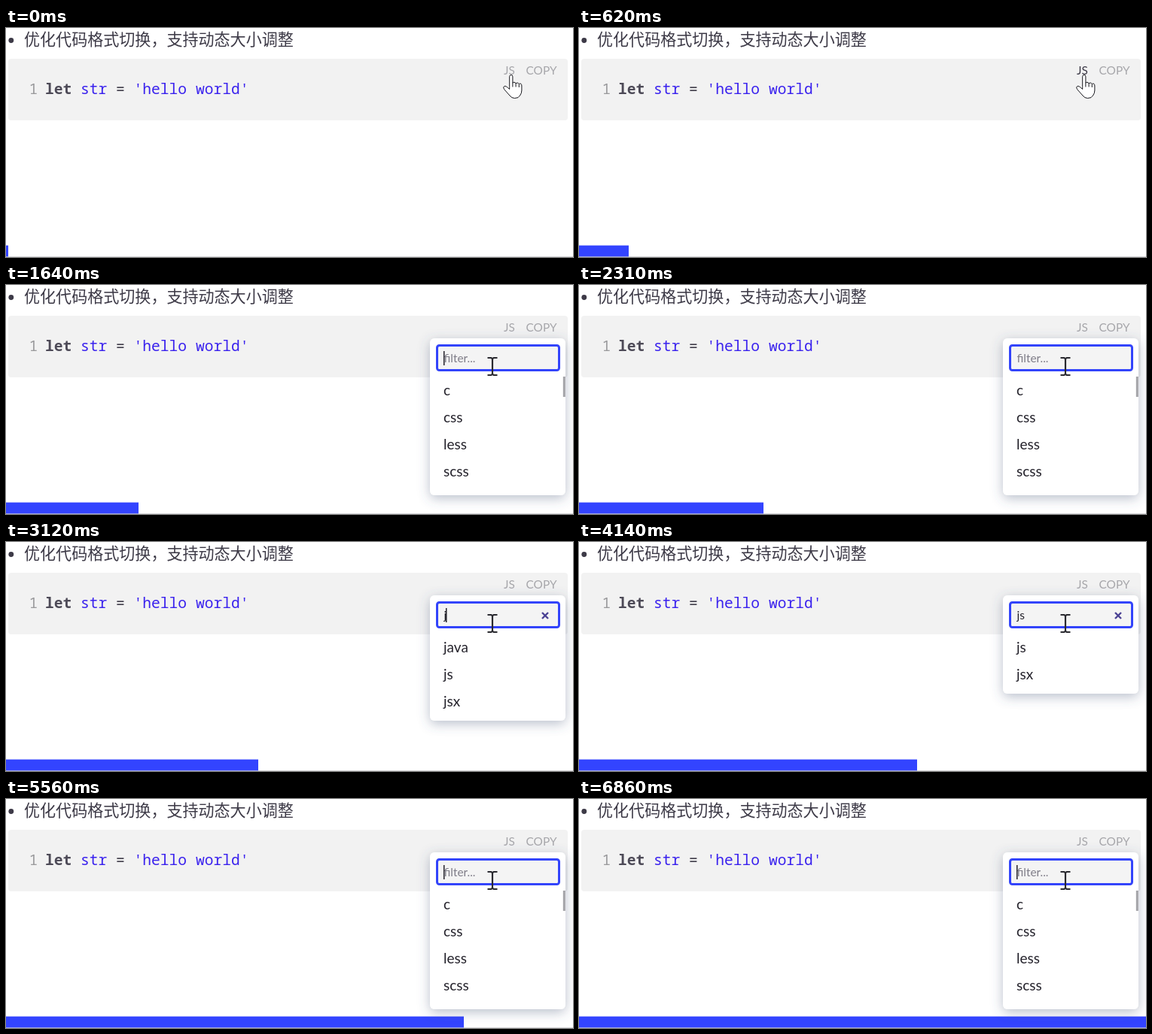
Recreate the animation shown at these times as an HTML page. Size 753 by 305 pixels, loop 6.89 s.

```html
<!DOCTYPE html>
<html lang="zh-CN">
<head>
<meta charset="utf-8">
<style>
  html, body { margin: 0; width: 100%; height: 100%; overflow: hidden; background: #fff; }
  svg { display: block; width: 753px; height: 305px; }
  text { white-space: pre; font-variant-ligatures: none; }
  .title { font: 300 21.05px "Noto Sans CJK SC", "Noto Sans CJK", sans-serif; fill: #3d3a47; }
  .code { font: 19.6px "Noto Sans Mono", monospace; fill: #3a22ee; }
  .number { fill: #9a9a9c; }
  .ui { font: 15.4px Lato, sans-serif; fill: #a7a7ab; }
  .item { font: 19px Lato, sans-serif; fill: #25232c; }
  .cursor { fill: #fff; stroke: #15151a; stroke-linejoin: round; }
</style>
</head>
<body>
<svg viewBox="0 0 753 305">
  <defs>
    <filter id="shadow" x="-20%" y="-20%" width="140%" height="140%">
      <feDropShadow dx="0" dy="4" stdDeviation="8" flood-color="#4a5578" flood-opacity=".38"/>
    </filter>
  </defs>
  <circle cx="6.8" cy="16.5" r="3.4" fill="#3d3a47"/>
  <text class="title" x="24" y="23">优化代码格式切换，支持动态大小调整</text>

  <rect x="3" y="41" width="743" height="82" rx="4" fill="#f2f2f2"/>
  <text class="code number" x="30.5" y="88">1</text>
  <text class="code" x="52" y="88"><tspan font-weight="700" fill="#4d4a57">let</tspan> str <tspan fill="#3d3a47">=</tspan> 'hello world'</text>
  <text class="ui" id="lang" x="661" y="62">JS</text>
  <text class="ui" x="690.5" y="62">COPY</text>

  <path d="M0 304.5H753" stroke="#dcdcde"/>
  <rect id="bar" y="289.6" height="14.8" fill="#3344ff"/>

  <g id="popup">
    <rect id="panel" x="563" y="71" width="180" rx="6" fill="#fff" filter="url(#shadow)"/>
    <rect x="571" y="79" width="165" height="36" rx="4" fill="#f4f4f4"/>
    <rect id="ring" x="572.5" y="80.5" width="162" height="33" rx="3" fill="none" stroke="#3344fb" stroke-width="3"/>
    <text class="ui" id="query" x="581.5" y="103"></text>
    <rect id="caret" y="88" width="1.5" height="19" fill="#25232c"/>
    <path id="clear" d="M712 94l8 8m0-8l-8 8" stroke="#4a4193" stroke-width="2.4"/>
    <g id="items"></g>
    <rect id="thumb" x="739.8" y="122" width="3" height="27" fill="#a3a3a8"/>
  </g>

  <g id="hand" class="cursor">
    <path d="M-1.8 16V2.2a2.1 2.1 0 0 1 4.2 0V10.500q2-2 4.200.6q2.400-1.600 4.200.8q3.400-1.400 3.600 2.600V20.500q0 4-2.400 7Q10.500 31 5 31Q1 31-1.500 27.500L-9 19q-1.800-3 .4-4q2-.8 6.800 4Z"/>
    <path d="M2.400 10.500v5.500M6.600 11.500v4.500M10.800 12.500v4" fill="none"/>
  </g>
  <path id="arrow" class="cursor" d="M0 0V24.500L5.200 19.600L8.800 27.500L12.400 26L9 18H17Z"/>
  <path id="beam" d="M-6.500-11H-1.500L0-9.500L1.500-11H6.500M0-9.500V10.500M-6.500 12H-1.500L0 10.500L1.500 12H6.500"
    fill="none" stroke="#2a2a30" stroke-width="2.2"/>
</svg>
<script>
const LOOP = 6890, WIDTH = 753, STEPS = 218;
const OPEN = 750, FOCUS = 1300, BLINK = 530;
const $ = id => document.getElementById(id);
const clamp = v => Math.max(0, Math.min(1, v));
const show = (id, on) => $(id).setAttribute('visibility', on ? 'inherit' : 'hidden');

// [time, value] points joined by straight lines
function along(points, t) {
  if (t <= points[0][0]) return points[0][1];
  for (let i = 1; i < points.length; i++) {
    const [t0, a] = points[i - 1], [t1, b] = points[i];
    if (t < t1) return a + (b - a) * (t - t0) / (t1 - t0);
  }
  return points[points.length - 1][1];
}

const progress = [[0, 0], [30, 1], [720, 22], [1420, 44], [2120, 64], [2830, 87], [3520, 109],
  [4230, 132], [4940, 155], [5650, 178], [6360, 201], [6890, 218]];
const mouseX = [[870, 670.5], [1030, 661], [1090, 661], [1250, 653], [1440, 653], [1580, 646]];
const mouseY = [[870, 62.5], [1030, 78], [1090, 78], [1250, 100], [1440, 100], [1580, 108]];
const hover = [[30, 0], [180, 1], [FOCUS, 1], [1400, 0]];

// Each keystroke restarts the caret blink
const allItems = ['c', 'css', 'less', 'scss'];
const inputs = [
  { at: FOCUS, text: '', items: allItems, height: 209, caret: 581 },
  { at: 2950, text: 'j', items: ['java', 'js', 'jsx'], height: 167, caret: 584 },
  { at: 3560, text: 'js', items: ['js', 'jsx'], height: 131, caret: 591.5 },
  { at: 5130, text: 'j', items: ['java', 'js', 'jsx'], height: 167, caret: 584 },
  { at: 5340, text: '', items: allItems, height: 209, caret: 581 }
];

let shown;
function drawInput(state) {
  if (state === shown) return;
  shown = state;
  $('query').textContent = state.text || 'filter...';
  $('query').style.fill = state.text ? '#25232c' : '#7f7d88';
  $('items').innerHTML = state.items
    .map((name, i) => `<text class="item" x="581" y="${147 + 36 * i}">${name}</text>`).join('');
  $('panel').setAttribute('height', state.height);
  $('caret').setAttribute('x', state.caret);
  show('clear', state.text);
  show('thumb', !state.text);
}

function drawCursor(t) {
  const x = along(mouseX, t), y = along(mouseY, t);
  const kind = y < 71 ? 'hand' : y < 79 ? 'arrow' : 'beam';
  for (const id of ['hand', 'arrow', 'beam']) show(id, id === kind);
  $(kind).setAttribute('transform', `translate(${x} ${y})`);
}

function draw(t) {
  const step = Math.floor(along(progress, t) + 0.01);
  $('bar').setAttribute('width', Math.round((step + 1) * WIDTH / STEPS));

  const dark = along(hover, t), mix = (a, b) => Math.round(a + (b - a) * dark);
  $('lang').style.fill = `rgb(${mix(167, 61)},${mix(167, 58)},${mix(171, 71)})`;

  const state = inputs.filter(s => s.at <= t).pop() || inputs[0];
  drawInput(state);
  $('popup').setAttribute('opacity', clamp((t - OPEN) / 150));
  show('ring', t >= FOCUS);
  show('caret', t >= FOCUS && Math.floor((t - state.at) / BLINK) % 2 === 0);
  drawCursor(t);
}

const start = performance.now();
function tick() {
  draw((performance.now() - start) % LOOP);
  requestAnimationFrame(tick);
}
draw(0);
requestAnimationFrame(tick);
</script>
</body>
</html>
```
